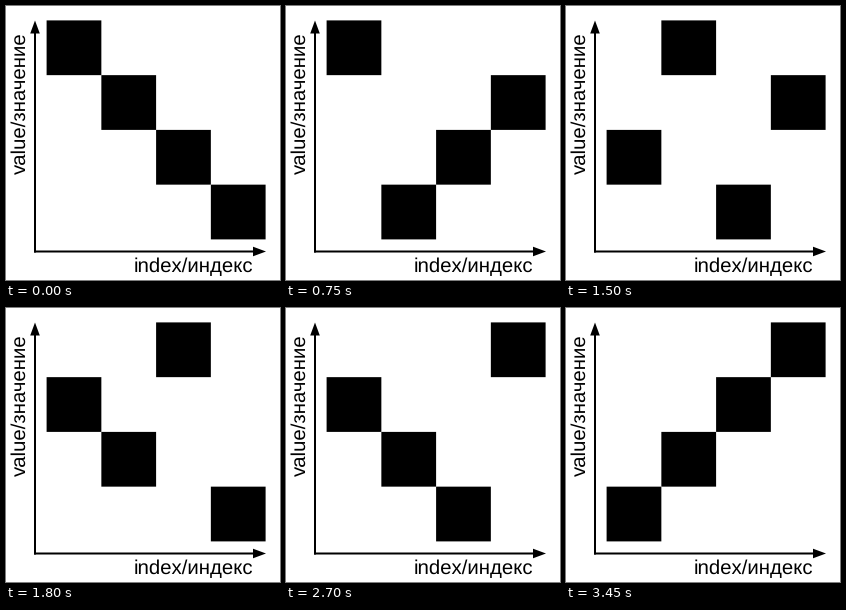
Recreate the animation shown at these times as a matplotlib script. Size 274 by 274 pixels, loop 4.2 s.

```python
from itertools import permutations

import matplotlib.pyplot as plt
from matplotlib.animation import FuncAnimation
from matplotlib.patches import Polygon, Rectangle

SIZE = 274
DPI = 137
TICK = 150
TICKS = 28
LEFT, TOP, CELL = 40.6, 14.4, 54.75
FONT_PX = 20.4

plt.rcParams["font.family"] = "Liberation Sans"
plt.rcParams["text.hinting"] = "none"

# The order lists, from the top row down, the column each square stands in.
ORDERS = list(permutations(range(4)))

fig = plt.figure(figsize=(SIZE / DPI, SIZE / DPI), dpi=DPI, facecolor="white")
ax = fig.add_axes([0, 0, 1, 1])
ax.set_xlim(0, SIZE)
ax.set_ylim(SIZE, 0)
ax.axis("off")


def shape(points):
    ax.add_patch(Polygon(points, closed=True, fc="black", lw=0, snap=False))


def bar(x0, y0, x1, y1):
    shape([(x0, y0), (x1, y0), (x1, y1), (x0, y1)])


def label(x, y, text, angle=0):
    ax.text(x, y, text, fontsize=FONT_PX * 72 / DPI, color="black",
            ha="left", va="baseline", rotation=angle, rotation_mode="anchor")


bar(28, 24, 30, 246.5)
bar(28, 244.5, 250, 246.5)
shape([(29, 14.5), (24.2, 27.5), (33.8, 27.5)])
shape([(260, 245.5), (247, 240.7), (247, 250.3)])
label(128, 266, "index/индекс")
label(20, 168, "value/значение", 90)

squares = [
    ax.add_patch(Rectangle((LEFT, TOP + row * CELL), CELL, CELL,
                           fc="black", lw=0, snap=False))
    for row in range(4)
]


def update(tick):
    order = ORDERS[min(tick, len(ORDERS) - 1)]
    for square, column in zip(squares, order):
        square.set_x(LEFT + column * CELL)
    return squares


anim = FuncAnimation(fig, update, frames=TICKS, interval=TICK,
                     repeat=True, repeat_delay=0, blit=False)
plt.show()
```
